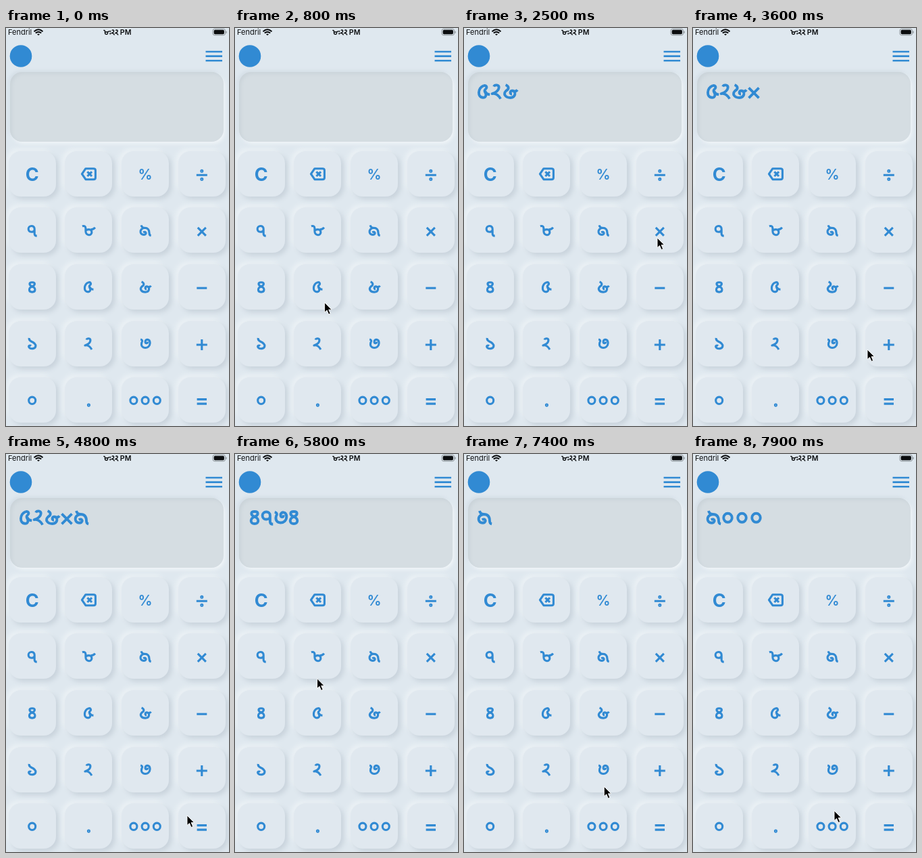
Animation, 330 px wide and 588 px high, one loop 8 s. Source, as an HTML page:

```html
<!DOCTYPE html>
<html lang="bn">
<meta charset="utf-8">
<title>Calculator</title>
<style>
html, body { margin: 0; width: 100%; height: 100%; overflow: hidden; background: #dfe8ef; }
#stage { position: relative; width: 330px; height: 588px; overflow: hidden; }
.key { position: absolute; width: 70px; height: 67px; border-radius: 18px; background: #e0e8ef;
  box-shadow: 4px 4px 7px #c9d3dc, -4px -4px 7px #ebf1f5; }
.key.down { box-shadow: none; }
#screen { position: absolute; left: 6px; top: 65px; width: 316px; height: 103px; border-radius: 18px;
  background: #d5dde2; box-shadow: inset 3px 3px 5px #cbd4da, 2px 3px 5px #f0f5f8, -2px -2px 5px #d3dde5; }
svg { position: absolute; left: 0; top: 0; }
text { font-family: Inter, Roboto, sans-serif; }
.ink { fill: none; stroke: #318ad3; stroke-width: 3.1; stroke-linejoin: round; }
.label { fill: #318ad3; text-anchor: middle; }
.status { font-size: 11px; fill: #0b0d0f; }
#clock .ink { stroke: #0b0d0f; }
</style>
<div id="stage">
  <div id="screen"></div>
  <svg id="art" width="330" height="588">
    <text class="status" x="3" y="10">Fendril</text>
    <g fill="none" stroke="#0b0d0f" stroke-width="2">
      <path d="M41.5 5.2Q48 -.8 54.5 5.2M43.8 7.6Q48 3.8 52.2 7.6"/>
      <path d="M46 9.2L48 11L50 9.2Q48 7.6 46 9.2Z" fill="#0b0d0f" stroke="none"/>
    </g>
    <g id="clock"></g>
    <text class="status" x="168.8" y="10" font-weight="600" style="font-size:10.6px">PM</text>
    <rect x="306" y="1.3" width="18.5" height="9.4" rx="2.8" fill="none" stroke="#8d9499"/>
    <rect x="307.6" y="2.8" width="15.3" height="6.4" rx="1.6" fill="#0b0d0f"/>
    <path d="M326 4.5v3.2" stroke="#8d9499" stroke-width="1.3"/>
    <circle cx="22" cy="41.5" r="16.3" fill="#318ad3"/>
    <path class="ink" style="stroke-width:2.6" d="M295.5 35h24.5M295.5 41.6h24.5M295.5 48.2h24.5"/>
    <g id="labels"></g>
    <g id="entry"></g>
    <path id="cursor" d="M0 0V14.5L3.5 11.5L6 17.5L8.6 16.4L6.1 10.6H10.5Z" fill="#000" stroke="#fff" stroke-width=".9"/>
  </svg>
</div>
<script>
const $ = id => document.getElementById(id);
const dot = y => `M-1 ${y}a1 1 0 1 1 2 0a1 1 0 1 1 -2 0`;

// Each glyph is a stroke centred on 0,0, followed by its advance in the display
const glyphs = {
  '০': ['M0 -5A5 5.2 0 1 1 0 5.4A5 5.2 0 1 1 0 -5', 21],
  '১': ['M-4.5 -8.5Q-5 -5.5 -1.5 -3.5C2 -2 5.5 0 5.2 3.5C4.8 7.5 -2 8.5 -4.5 5.5C-6 3 -3.5 1.8 -1.5 3', 18],
  '২': ['M-3.5 -6C-2.5 -8.5 3 -8.5 2.5 -4.5C2 -1 -1 1 -5.5 2.5C-1 1.5 2.5 5 4.5 8.5', 19],
  '৩': ['M-7 -6.5Q-3 -5.5 -5.2 -2C-8.5 8.5 7 8.5 7 -1C7 -7.5 0 -7.5 0 -3C0 0 3.5 0 3.5 -3', 21],
  '৪': ['M0 -1C-5 -3 -5 -7.2 0 -7.2S5 -3 0 -1C-5.8 1 -5.5 7.2 0 7.2S5.8 1 0 -1', 18],
  '৫': ['M-.5 -7C-7.5 -4 -8 7 -1 7C2 7 3 4.5 2 2C1 0 0 -1 1.5 -2.5C4.5 -5 3 -8 -.5 -7M1.5 -.5Q2.5 3 7 3.5', 19],
  '৬': ['M-5.5 -8C-1 -6 -1.5 -3 -5 -1C-9 3 -5.5 7.2 0 7.2C6.5 7 7 0 3 -1C-.5 -1.5 -1 3 2 3M4 -.5Q7 0 8.5 -2', 21],
  '৭': ['M3.5 -1C3 3 -5.5 3.5 -5.5 -2.5C-5.5 -8 3.5 -8.5 3.5 -2.5V5Q3.8 7.8 7 7.8', 19],
  '৮': ['M-9.5 -6.5Q-4.5 -8 -4.5 -3V1C-4.5 8 4.5 8 4.5 2.5C4.5 -2.5 -1 -2.5 -4.5 0M3 -1.5Q7 -1.5 9.5 -4.5', 21],
  '৯': ['M-6 -8Q-5 -4 -1 -4C5 -4 6 0 6 4Q6 7 8.5 7.5M-1 -4C-5 -3.5 -7.5 -1 -7 2.5C-6 7.5 1.5 7 1 3.5Q0 1 -3 2.5', 21],
  '÷': [`M-8 1.5H8${dot(-4.5)}${dot(7.5)}`, 22],
  '×': ['M-6 -4.5L6 7.5M6 -4.5L-6 7.5', 22],
  '−': ['M-7.5 1.3H7.5', 22],
  '+': ['M-8 1.5H8M0 -6.5V9.5', 22],
  '=': ['M-7.2 -1.5H7.2M-7.2 5H7.2', 22],
  '.': [dot(7), 12],
  ':': [dot(-3) + dot(5), 12],
  '⌫': ['M-10 0L-4.5 -8H7Q10 -8 10 -5.5V5.5Q10 8 7 8H-4.5ZM-2 -3.3L4.6 3.3M4.6 -3.3L-2 3.3', 24]
};

const draw = (c, x, y, scale = 1) =>
  `<path class="ink" aria-label="${c}" d="${glyphs[c][0]}" transform="translate(${x} ${y}) scale(${scale})"/>`;

const rows = [['C', '⌫', '%', '÷'], ['৭', '৮', '৯', '×'], ['৪', '৫', '৬', '−'],
  ['১', '২', '৩', '+'], ['০', '.', '০০০', '=']];
const keys = {};

function label(name, x, y) {
  if (name === 'C') return `<text class="label" x="${x}" y="${y + 9.8}" font-size="27" font-weight="700">C</text>`;
  if (name === '%') return `<text class="label" x="${x}" y="${y + 7.8}" font-size="21" font-weight="600">%</text>`;
  return [...name].map((c, i) => draw(c, x + (i - (name.length - 1) / 2) * 17.2, y)).join('');
}

let labels = '';
rows.forEach((row, r) => row.forEach((name, c) => {
  const x = 38.7 + c * 83.7, y = 215.7 + r * 83.6;
  const key = document.createElement('div');
  key.className = 'key';
  key.style.left = x - 35 + 'px';
  key.style.top = y - 34 + 'px';
  $('stage').insertBefore(key, $('screen'));
  keys[name] = key;
  labels += label(name, x, y);
}));
$('labels').innerHTML = labels;
$('clock').innerHTML = draw('৮', 148.5, 6.5, .45) + draw(':', 154.3, 6.2, .45) +
  draw('২', 158.5, 6.5, .45) + draw('২', 164, 6.5, .45);

// Press time, key, resulting display
const presses = [
  [1000, '৫', '৫'], [1500, '২', '৫২'], [2100, '৬', '৫২৬'], [2700, '×', '৫২৬×'],
  [4300, '৯', '৫২৬×৯'], [5000, '=', '৪৭৩৪'], [6200, 'C', ''], [7000, '৯', '৯'], [7500, '০০০', '৯০০০']
];
// Cursor stops: time, x, y
const stops = [
  [300, 190, 600], [900, 128, 390], [1200, 128, 390], [1500, 144, 443], [1600, 144, 443],
  [2000, 208, 390], [2200, 208, 390], [2500, 286, 310], [3000, 286, 310], [3600, 258, 475],
  [4200, 208, 306], [4400, 208, 306], [4800, 268, 534], [5500, 268, 534], [6000, 42, 222],
  [6300, 42, 222], [6800, 190, 288], [7100, 198, 298], [7500, 209, 527], [8000, 209, 527]
];

function cursorAt(t) {
  const i = stops.findIndex(s => s[0] > t);
  const a = stops[i - 1], b = stops[i];
  const p = (t - a[0]) / (b[0] - a[0]);
  const e = p * p * (3 - 2 * p);
  return [a[1] + (b[1] - a[1]) * e, a[2] + (b[2] - a[2]) * e];
}

let shown = '';
function frame(now) {
  const t = Math.floor(now % 8000 / 100) * 100;
  let text = '', held = '';
  for (const [start, name, result] of presses) {
    if (t >= start + 100) text = result;
    if (t >= start && t < start + 200) held = name;
  }
  for (const name in keys) keys[name].classList.toggle('down', name === held);

  if (text !== shown) {
    let x = 20;
    $('entry').innerHTML = [...text].map(c => {
      const w = glyphs[c][1];
      x += w;
      return draw(c, x - w / 2, 94, 1.25);
    }).join('');
    shown = text;
  }

  const visible = t >= stops[0][0];
  $('cursor').style.display = visible ? '' : 'none';
  if (visible) $('cursor').setAttribute('transform', `translate(${cursorAt(t)})`);
  requestAnimationFrame(frame);
}
requestAnimationFrame(frame);
</script>
</html>
```
